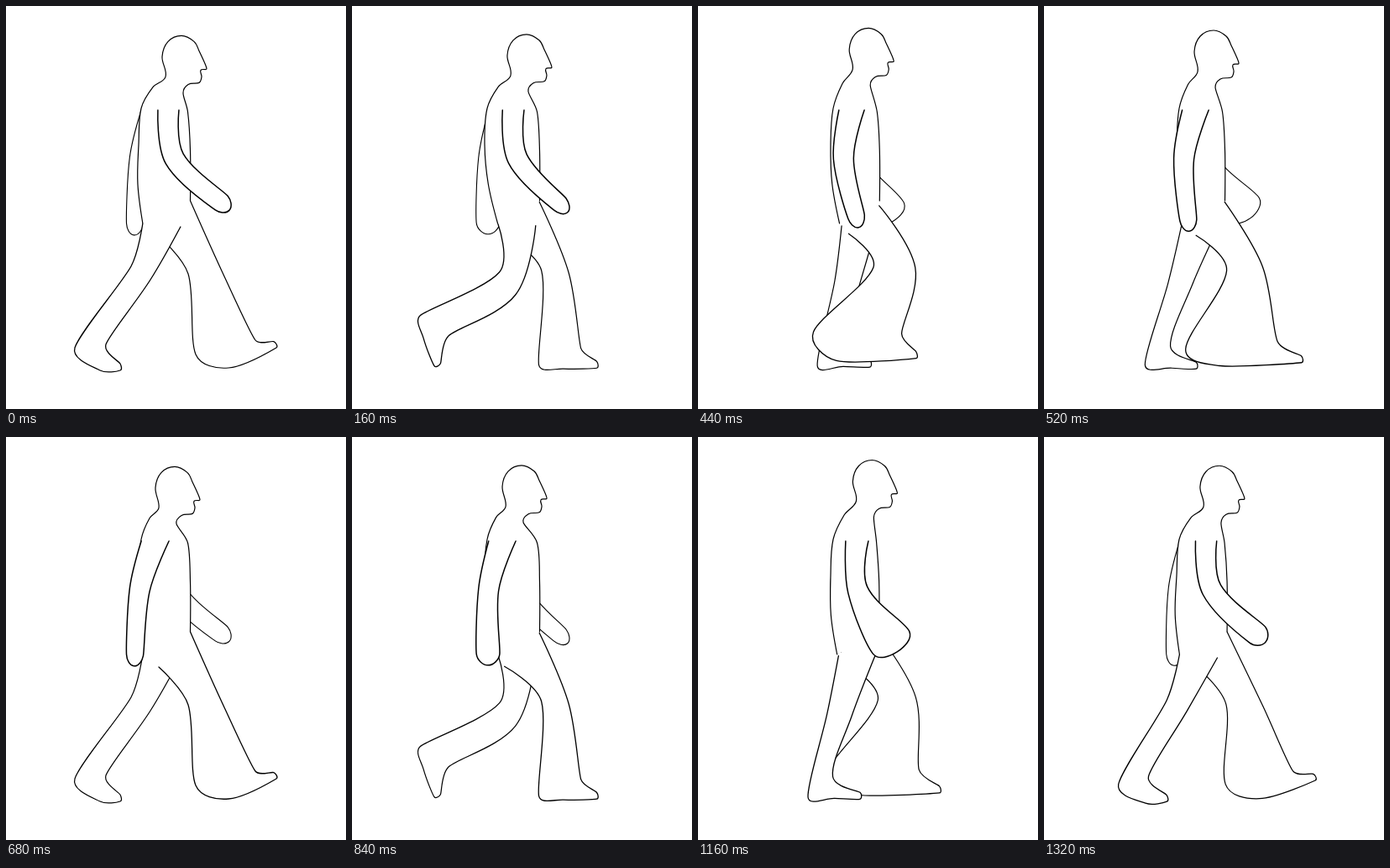
An HTML page with a canvas for the animation above (1360 ms loop, 405 by 480 pixels).

```html
<!DOCTYPE html>
<html lang="en">
<head>
<meta charset="utf-8">
<title>Walk cycle</title>
<style>
html, body { margin: 0; width: 100%; height: 100%; overflow: hidden; background: #fff; }
canvas { display: block; }
</style>
</head>
<body>
<canvas id="stage" width="405" height="480"></canvas>
<script>
const LOOP = 1360, STEP = 40, TURN = 2 * Math.PI;
const { sin, cos, max, min, hypot } = Math;
const ctx = document.getElementById('stage').getContext('2d');

// Head profile from the nape over the crown to the throat.
const HEAD = [[186, 79], [182, 55], [189, 37], [205, 30], [220, 37], [226, 48], [235, 69],
              [228, 71], [229, 79], [226, 86], [213, 88], [207, 98]];

// Closed paths of the leg's key points: push-off, swing, strike, stance.
const LEG_PATHS = [
  [[149, 310], [177, 317], [194, 308], [217, 315], [217, 319], [225, 315], [189, 320], [149, 330]], // knee back
  [[82, 407], [82, 367], [103, 361], [165, 407], [226, 415], [221, 428], [171, 426], [123, 428]],   // heel
  [[112, 434], [85, 395], [110, 412], [205, 428], [265, 431], [250, 432], [200, 428], [155, 431]],  // sole
  [[136, 434], [99, 428], [185, 410], [303, 425], [322, 407], [289, 432], [235, 428], [184, 432]],  // toe
  [[119, 403], [117, 392], [187, 378], [275, 399], [297, 398], [270, 408], [202, 399], [153, 405]], // instep
  [[172, 326], [197, 344], [250, 319], [260, 310], [260, 322], [257, 318], [217, 335], [178, 332]]  // knee front
];

const add = (p, d, k = 1) => [p[0] + d[0] * k, p[1] + d[1] * k];
const mix = (p, q, k) => [p[0] + (q[0] - p[0]) * k, p[1] + (q[1] - p[1]) * k];
const gap = (p, q) => hypot(q[0] - p[0], q[1] - p[1]) || 0.01;
const aim = (p, q) => [(q[0] - p[0]) / gap(p, q), (q[1] - p[1]) / gap(p, q)];
const left = ([x, y]) => [-y, x];

// Smooth position on a closed path for a phase in radians.
function along(path, phase) {
  const n = path.length, s = (phase / TURN + 1) % 1 * n, i = Math.floor(s), u = s - i;
  const [a, b, c, d] = [-1, 0, 1, 2].map(k => path[(i + k + n) % n]);
  return [0, 1].map(k => b[k] + u / 2 * (c[k] - a[k]
    + u * (2 * a[k] - 5 * b[k] + 4 * c[k] - d[k] + u * (3 * (b[k] - c[k]) + d[k] - a[k]))));
}

// Control point beside p, on the side of the neighbour "to".
function handle(p, from, to) {
  if (!from) return p;
  return add(p, aim(from, to), 0.35 * min(gap(p, to), 1.3 * gap(p, from)));
}

// Strokes a smooth open line; the white fill also covers the optional anchor.
function drawShape(points, width, anchor = points[0]) {
  const line = new Path2D();
  line.moveTo(...points[0]);
  for (let i = 1; i < points.length; i++) {
    const p = points[i - 1], q = points[i];
    line.bezierCurveTo(...handle(p, points[i - 2], q), ...handle(q, points[i + 1], p), ...q);
  }
  const area = new Path2D(line);
  area.lineTo(...anchor);
  ctx.fill(area);
  ctx.lineWidth = width;
  ctx.stroke(line);
}

// The pelvis and the belly shift once per step.
const hipAt = phase => [169 - 8 * cos(2 * phase + 0.7), 259];
const waistAt = phase => [219.5 + 4 * sin(2 * phase), 232];

function drawBody(phase) {
  const hip = hipAt(phase), waist = waistAt(phase);
  const bob = [4 * cos(phase), 1 + 5 * cos(2 * phase - 0.5)];
  drawShape([
    hip, [160 + (hip[0] - 169) / 2, 212], [158, 165], [161, 122], add([173, 94], bob, 0.5),
    ...HEAD.map(p => add(p, bob)),
    add(waist, [-3, -106]), add(waist, [0, -60]), waist
  ], 1.2);
}

function drawLeg(phase, width) {
  const hip = hipAt(phase), forward = (1 - cos(phase)) / 2;
  const ease = forward * forward * (3 - 2 * forward);
  const [kneeBack, heel, sole, toe, instep, kneeFront] = LEG_PATHS.map(p => along(p, phase));
  const toeTop = add(toe, left(aim(sole, toe)), -8);
  drawShape([
    mix(hip, [182, 274], ease), kneeBack, heel, sole, toe, toeTop, instep, kneeFront,
    mix(add(hip, [45, 4]), waistAt(phase), ease)
  ], width, [195, 225]);
}

function drawArm(phase, width) {
  const swing = cos(phase - 0.14), flare = max(0, -sin(phase - 0.26)) ** 2;
  const back = [171 + 10 * swing, 124], front = [200 + 6 * swing, 124];
  const elbow = [180 + 21 * swing, 182];
  const hand = [205 + 52 * swing, 247 - 13 * swing + 5 * flare];
  const bend = left(aim(mix(back, front, 0.5), hand));
  const reach = aim(elbow, hand), side = left(reach), palm = 10 + 18 * flare;
  drawShape([
    back, add(elbow, bend, 12), add(hand, side, palm), add(hand, reach, 13),
    add(hand, side, -palm), add(elbow, bend, -12), front
  ], width);
}

function draw(now) {
  const near = Math.floor(now % LOOP / STEP) * STEP / LOOP * TURN, far = near + TURN / 2;
  ctx.fillStyle = '#fff';
  ctx.strokeStyle = '#000';
  ctx.lineCap = ctx.lineJoin = 'round';
  ctx.fillRect(0, 0, 405, 480);
  drawArm(far, 1.1);
  drawLeg(far, 1.2);
  drawBody(near);
  drawLeg(near, 1.3);
  drawArm(near, 1.5);
}

let start;
function tick(now) {
  start ??= now;
  draw(now - start);
  requestAnimationFrame(tick);
}
draw(0);
requestAnimationFrame(tick);
</script>
</body>
</html>
```
